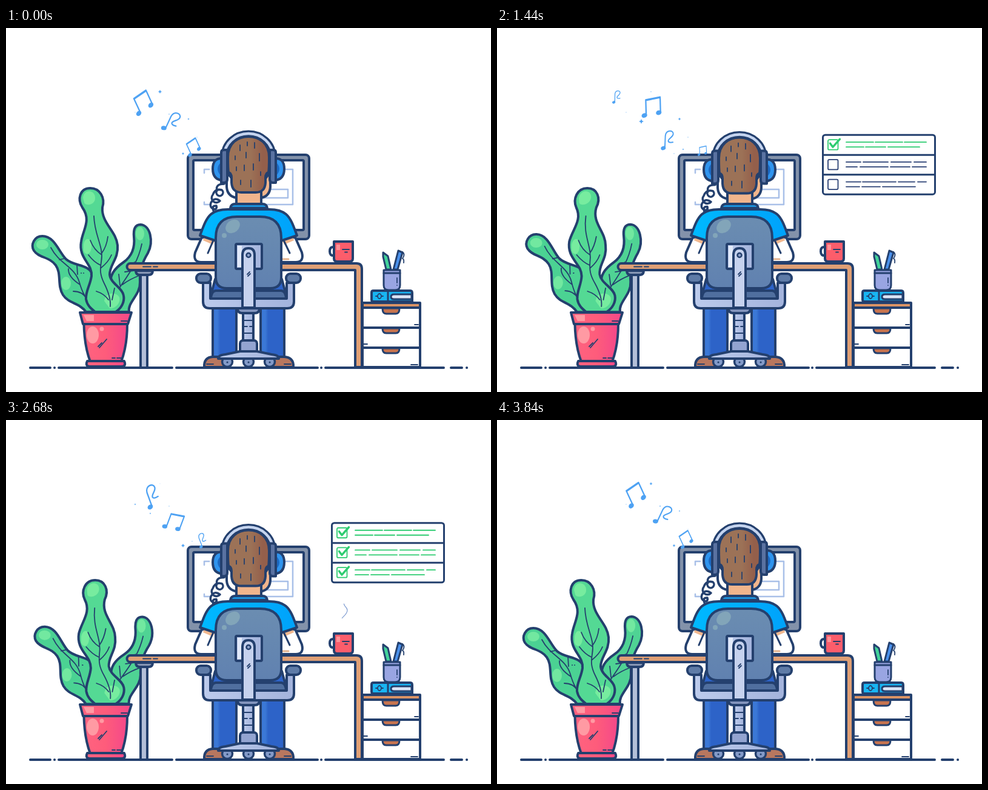
Write an HTML page that moves like this. It is 800 px wide and 600 px high and loops after 3880 ms.

```html
<!DOCTYPE html>
<html lang="en">
<head>
<meta charset="utf-8">
<title>Working with music</title>
<style>
html, body { margin: 0; width: 100%; height: 100%; overflow: hidden; background: #fff; }
svg { display: block; width: 800px; height: 600px; }
.ink { stroke: #24406e; stroke-width: 4; stroke-linecap: round; stroke-linejoin: round; }
.thin { stroke-width: 1.8; fill: none; }
.line { fill: none; }
.flat { stroke: none; }
</style>
</head>
<body>
<svg viewBox="0 0 800 600">
<defs>
  <linearGradient id="pink"><stop stop-color="#ff6380"/><stop offset=".5" stop-color="#fe5c7b"/><stop offset="1" stop-color="#f4488a"/></linearGradient>
  <linearGradient id="hair"><stop offset=".55" stop-color="#9c7257"/><stop offset=".85" stop-color="#945f4b"/></linearGradient>
  <linearGradient id="shirt"><stop stop-color="#00b9ff"/><stop offset="1" stop-color="#00a2fb"/></linearGradient>
  <linearGradient id="jeans"><stop offset=".2" stop-color="#3b78d6"/><stop offset=".32" stop-color="#2d63c8"/></linearGradient>
  <linearGradient id="back" x2="0" y2="1"><stop stop-color="#6b8db1"/><stop offset="1" stop-color="#6081b0"/></linearGradient>
  <linearGradient id="steel"><stop stop-color="#bccbec"/><stop offset="1" stop-color="#a3b3dc"/></linearGradient>
</defs>

<g class="ink">
  <path class="line" d="M40 560H73M80 560h.1M87 560H274M281 560H514M520 560h.1M527 560H722M734 560H752M760 560h.1"/>

  <g id="rightLeaf">
    <path fill="#4fd394" d="M222 324C212 324 210 333 211 344C213 362 208 376 194 386C178 397 171 407 172 425L178 468H203C200 452 222 440 221 419C220 400 225 386 234 371C244 352 238 325 222 324Z"/>
    <ellipse class="flat" cx="221" cy="339" rx="7" ry="11" fill="#72e8a0"/>
    <path class="thin" d="M224 356C218 385 205 402 186 430M212 386L210 400L196 402M220 408Q204 414 192 423M186 406L188 424"/>
  </g>
  <g id="leftLeaf">
    <path fill="#4bd293" d="M60 343C47 343 40 357 46 367C54 379 72 377 82 391C92 405 84 424 94 440C104 455 120 452 132 468H152L142 405C136 389 112 393 99 381C87 369 80 343 60 343Z"/>
    <ellipse class="flat" cx="60" cy="357" rx="10" ry="8" fill="#72e8a0"/>
    <ellipse class="flat" cx="99" cy="421" rx="8" ry="11" fill="#72e8a0"/>
    <path class="thin" d="M74 362C88 389 113 393 121 419C126 437 132 446 140 456M88 382L96 380M103 397Q102 410 122 423M117 390L118 406M124 404h.1M111 434Q126 434 133 446"/>
  </g>
  <g id="midLeaf">
    <path fill="#54d994" d="M139 264C122 264 117 282 126 296C141 317 127 332 124 352C119 380 143 388 141 409C139 424 131 434 132 447C134 458 141 463 147 468H181C190 462 196 452 194 441C192 428 172 421 171 406C171 390 186 380 184 358C182 335 157 321 159 296C164 280 155 264 139 264Z"/>
    <path class="flat" fill="#77ec9f" d="M127 280C128 265 146 266 147 279C148 292 132 294 129 288Z"/>
    <path class="flat" fill="#77ec9f" d="M128 357C131 341 143 348 141 361C140 375 130 375 128 367Z"/>
    <path class="flat" fill="#77ec9f" d="M162 450C164 435 182 434 187 444C190 454 178 464 171 462Z"/>
    <path class="thin" d="M145 310C146 344 162 360 157 386C155 399 155 407 162 421C169 435 173 447 172 459M139 350Q145 366 158 374M168 344Q166 360 158 371M136 374Q145 386 156 391M174 374Q169 386 156 396M149 434Q162 438 169 448M179 429L175 448M128 404h.1"/>
  </g>

  <path fill="url(#pink)" d="M128.500 488C129 514 133 534 139 550H190C196 534 200 514 200 488Z"/>
  <path fill="url(#pink)" d="M122 469H207L201 488H127Z"/>
  <path fill="url(#pink)" d="M134 549H195Q199 558 190 558H139Q130 558 134 549Z"/>
  <g class="flat" fill="#ff9aa3"><ellipse cx="143" cy="506" rx="10" ry="14"/><circle cx="158" cy="496" r="3.5"/><path d="M128 473h17v10h-12z"/></g>
  <path class="thin" d="M152 525L158 519M154 527L166 513M190 483H200M175 544H180M183 544H191"/>

  <rect x="300" y="209" width="200" height="139" rx="6" fill="#8392aa"/>
  <rect x="309" y="218" width="182" height="115" rx="2" fill="#fff"/>
  <path class="line" style="stroke:#a9c0e8;stroke-width:2.5" d="M327 239V233H335M327 287V291H335M440 233H473V291H426M424 266H465V280H424"/>
</g>

<g id="sparks" fill="#4ea2f3"></g>
<g id="notes" fill="none" stroke="#4ea2f3" stroke-width="2.3" stroke-linecap="round" stroke-linejoin="round"></g>

<g class="ink">
  <rect x="222" y="405" width="11" height="155" fill="#b3bfd8"/>
  <path fill="#8797b5" d="M214 400H242Q242 407 235 407H221Q214 407 214 400Z"/>
  <path fill="#df9f75" d="M205 388H578Q587 388 587 397V559H576V399H205A5.5 5.5 0 0 1 205 388Z"/>
  <path class="thin" d="M226 393.500H239M243 393.500H250"/>

  <path fill="#fff" d="M588 460H683V559H588Z"/>
  <path fill="#da9365" d="M588 453H683V461H588Z"/>
  <path class="line" d="M588 494H683M588 527H683"/>
  <path fill="#c8744f" stroke-width="3" d="M621 462H649Q649 471 643 471H627Q621 471 621 462ZM621 495H649Q649 503 643 503H627Q621 503 621 495ZM621 528H649Q649 536 643 536H627Q621 536 621 528Z"/>
  <path class="thin" d="M674 489H680M590 521H596M668 555H679"/>

  <path fill="#18b5f3" d="M606 433H667Q670 433 670 437V451H606Q603 451 603 448V436Q603 433 606 433Z"/>
  <path fill="#dbe5f8" style="stroke-width:3" d="M669 439H640Q635 439 635 443Q635 447 640 447H669Z"/>
  <path class="line" style="stroke-width:3" d="M630 434V450"/>
  <path class="thin" d="M610 442H613M619 442H622M616 438a3 4 0 0 1 0 8a3 4 0 0 1 0 -8"/>
  <path fill="#42d39a" style="stroke-width:3" d="M622 370L630 376L635 398H627L622 377Z"/>
  <path fill="#4a91ec" style="stroke-width:3" d="M647 367L654 370L646 398H639Z"/>
  <path class="thin" d="M654 369Q659 373 654 380Q657 381 656 387"/>
  <path fill="#99a5e2" style="stroke-width:3" d="M623 399H650V424Q650 432 642 432H631Q623 432 623 424Z"/>
  <path class="line" style="stroke-width:3" d="M623 404H650"/>
  <path class="thin" d="M645 412V420M645 424v.1"/>
  <path class="line" d="M541 361Q534 360 534 368Q534 376 541 375"/>
  <path fill="#fc5d6b" d="M541 352H572V380Q572 385 567 385H546Q541 385 541 380Z"/>
  <path class="flat" fill="#ff9197" d="M545 357h6v9h-6z"/>
  <path class="thin" d="M555 365H566M559 369.500H563"/>

  <path fill="#fff" d="M323 345L312 370Q308 386 322 386H346V348ZM477 345L488 370Q492 386 478 386H454V348Z"/>
  <path class="flat" fill="#f1b88f" d="M327 344L345 350L341 357L325 350ZM473 344L455 350L459 357L475 350Z"/>
  <path class="line" style="stroke-width:3" d="M342 350L333 371M458 350L468 371"/>
  <path class="line" style="stroke-width:3;stroke:#e2b18e" d="M456 381H466"/>
  <path fill="url(#shirt)" d="M320 342C326 326 330 314 338 307C345 301 354 299 366 299H434C446 299 455 301 462 307C470 314 474 326 480 342L456 350H344Z"/>
  <path class="flat" fill="#f1b58c" d="M380 264H421V292H380Z"/>
  <path class="line" d="M380 278V290M421 278V290"/>
  <path fill="#1c91dc" d="M370 297Q371 290 378 290H423Q430 290 431 297Z"/>
</g>

<g id="head" class="ink">
  <path class="line" style="stroke-width:3.500" d="M360 257Q345 257 348 268A5.500 5.500 0 1 0 356 267Q345 264 341 275A5.500 5.500 0 1 0 353 285Q344 278 338 288Q335 297 345 299A5 5 0 0 0 347 293Q339 292 342 301"/>
  <path fill="#fff" d="M364 237V262Q365 277 380 280V258Z"/>
  <path fill="#f1b58c" d="M436 237V262Q435 277 421 280V258Z"/>
  <path class="line" style="stroke-width:11" d="M360 211A40 37 0 0 1 440 211"/>
  <path class="line" style="stroke-width:4.500;stroke:#c5d4ef" d="M360 211A40 37 0 0 1 440 211"/>
  <path fill="url(#hair)" d="M366 213C366 190 382 179 400 179C418 179 434 190 434 213C434 228 434 233 433 238Q428 239 428 247V255Q427 271 412 271H388Q373 271 372 255V247Q372 239 367 238Q366 232 366 213Z"/>
  <path class="thin" d="M386 193V202M398 188V194M410 189V198M378 211V217M396 205V214M418 207V219M380 229V235M393 226V235M408 224V234M420 237V243M387 251V258M404 251V262"/>
  <path fill="#2f94ee" d="M357 215Q341 214 341 232Q341 250 357 251ZM443 215Q459 214 459 232Q459 250 443 251Z"/>
  <path class="flat" fill="#1c69c2" d="M355 221Q343 232 355 244ZM445 221Q457 232 445 244Z"/>
  <path fill="#5a72a1" d="M355 205Q355 201 359 201H365V249Q365 255 360 255H355ZM445 205Q445 201 441 201H435V249Q435 255 440 255H445Z"/>
</g>

<g class="ink">
  <path fill="url(#jeans)" d="M341 455H380V542H341Z"/>
  <path fill="url(#jeans)" d="M420 455H459V542H420Z"/>
  <path fill="#2d63c8" d="M345 414L338 440H462L455 414Z"/>
  <path fill="#b8775f" d="M341 542H362V559H327Q326 543 341 542ZM459 542H438V559H474Q475 543 459 542Z"/>
  <path class="thin" d="M331 554H342M459 554H470"/>
  <path fill="#506f9f" d="M338 447Q338 434 346 433H454Q462 434 462 447Z"/>
  <path fill="url(#steel)" d="M325 420V451Q325 462 336 462H464Q475 462 475 451V420H463V446H337V420Z"/>
  <rect x="314" y="405" width="24" height="15" rx="7" fill="#5e7ba7"/>
  <rect x="462" y="405" width="24" height="15" rx="7" fill="#5e7ba7"/>
  <path fill="url(#back)" d="M346 346Q346 311 381 311H419Q454 311 454 346V411Q454 429 436 429H364Q346 429 346 411Z"/>
  <ellipse class="flat" cx="374" cy="327" rx="13" ry="10" transform="rotate(-40 374 327)" fill="#82a5b9"/>
  <circle class="flat" cx="360" cy="342" r="4" fill="#82a5b9"/>
  <path fill="#8294bd" d="M382 462H418Q418 470 410 470H390Q382 470 382 462Z"/>
  <path fill="url(#steel)" d="M391 470H408V516H391Z"/>
  <path class="thin" d="M393 482H406M393 492H398M402 492H407M393 503H406"/>
  <rect x="379" y="356" width="43" height="41" rx="2" fill="url(#steel)"/>
  <path class="flat" fill="#e2eafa" d="M382 359H389V394H382Z"/>
  <path fill="#c6d2ee" d="M390 461V374Q390 363 400 363Q410 363 410 374V461Z"/>
  <circle cx="400" cy="374.500" r="3.500" fill="#8da0c9" style="stroke-width:2.5"/>
  <path class="thin" d="M398 406L402 402M399 409L403 405"/>
  <rect x="386" y="515" width="28" height="24" rx="5" fill="#93a4d1"/>
  <g fill="#849bc9" style="stroke-width:3.500"><circle cx="365" cy="550" r="8.500"/><circle cx="400" cy="550" r="8.500"/><circle cx="435" cy="550" r="8.500"/></g>
  <path fill="url(#steel)" d="M350 545Q350 539 362 538L386 533H414L438 538Q450 539 450 545Z"/>
  <path class="line" style="stroke-width:3" d="M365 551h.1M400 551h.1M435 551h.1"/>
</g>

<path id="steam" fill="none" stroke="#7d9bd0" stroke-width="1.2" pathLength="100" d="M554 348C562 343 555 339 553 333C551 325 562 323 563 314C563 308 559 310 557 302"/>

<g id="list" fill="none" stroke-linecap="round" stroke-linejoin="round">
  <g class="ink" style="stroke-width:3">
    <rect x="537.500" width="185" height="98" rx="4" fill="#fff"/>
    <path d="M538 33H722M538 65.500H722"/>
  </g>
</g>
</svg>

<script>
const LOOP = 3880, STEP = 40, TAU = Math.PI * 2;
const $ = id => document.getElementById(id);
const clamp = v => Math.max(0, Math.min(1, v));

function make(tag, attrs = {}) {
  const el = document.createElementNS('http://www.w3.org/2000/svg', tag);
  for (const k in attrs) el.setAttribute(k, attrs[k]);
  return el;
}
const add = (parent, tag, attrs) => parent.appendChild(make(tag, attrs));

// Linear interpolation through [time, value] pairs
function along(keys, t) {
  let i = 1;
  while (i < keys.length - 1 && t > keys[i][0]) i++;
  const [t0, a] = keys[i - 1], [t1, b] = keys[i];
  return a + (b - a) * clamp((t - t0) / (t1 - t0));
}

const mix = (a, b, k) => `rgb(${a.map((v, i) => Math.round(v + (b[i] - v) * k))})`;
const NAVY = [42, 64, 116], GREEN = [46, 204, 113];

// Middle leaf: every point shifts sideways depending on its height
const leafParts = [...$('midLeaf').children].map(el => [el, el.getAttribute('d')]);
function swayLeaf(s) {
  for (const [el, d] of leafParts) {
    el.setAttribute('d', d.replace(/([\d.]+) ([\d.]+)/g, (m, x, y) => {
      const bend = 12 * s * Math.cos(Math.PI * (y - 262) / 110) * (466 - y) / 204;
      return `${(+x + bend).toFixed(2)} ${y}`;
    }));
  }
}

// Notes: all follow one route, born 970 ms apart
const route = make('path', {
  d: 'M354 211L336 200L315 197L291 192L281 184L277 162L271 149L257 130L234 124L224 122L208 117L190 111'
});
const SINGLE = 'M-5 15V-8C-4 -20 10 -20 10 -12C10 -6 1 -3 1 2Q2 6 10 4';
const DOUBLE = 'M-11 14V-12L13 -16V10M-11 -11L13 -15';
const notes = [0, 1, 2, 3].map(i => {
  const el = add($('notes'), 'g');
  const double = i % 2;
  add(el, 'path', { d: double ? DOUBLE : SINGLE });
  for (const [x, y] of double ? [[-14, 14], [10, 10]] : [[-8, 16]])
    add(el, 'ellipse', { cx: x, cy: y, rx: 3.6, ry: 2.6, fill: '#4ea2f3', transform: `rotate(-20 ${x} ${y})` });
  return { el, birth: 200 + i * 970 };
});
const noteSize = [[0, .3], [320, .5], [900, .8], [1800, .95], [2300, 1], [2700, 1], [3250, .5], [3400, 0]];

// Sparks: x, y, time of the peak, size
const sparks = [
  [254, 105, 150, 1], [301, 150, 260, 1], [238, 154, 450, 1], [292, 207, 780, .8],
  [315, 180, 250, .4], [213, 139, 700, .4], [307, 200, 520, .4], [269, 142, 900, .3]
].map(([x, y, peak, size]) => ({
  x, y, peak, size, el: add($('sparks'), 'path', { d: 'M0 -4L1.300 -1.300L4 0L1.300 1.300L0 4L-1.300 1.300L-4 0L-1.300 -1.300Z' })
}));

// Checklist rows: dashes of the upper and the lower line
const rows = [
  ['M576 12h45m3 0h45m3 0h36', 'M576 20h29m3 0h33m4 0h52'],
  ['M576 12h24m4 0h41m5 0h33m5 0h20', 'M576 20h18m5 0h46m4 0h32m4 0h23'],
  ['M576 12h24m3 0h55m4 0h27m5 0h14', 'M576 20h22m4 0h30m4 0h54']
].map((lines, i) => {
  const g = add($('list'), 'g', { transform: `translate(0 ${i * 32.7})`, 'stroke-width': 1.8 });
  const text = add(g, 'path', { d: lines.join('') });
  const box = add(g, 'rect', { x: 546, y: 8, width: 16.5, height: 16.5, rx: 2 });
  const tick = add(g, 'path', {
    d: 'M549.500 14L554 20L565.500 7', stroke: `rgb(${GREEN})`, 'stroke-width': 3.4, pathLength: 100
  });
  return { text, box, tick, start: 1080 + i * 640 };
});
const listTop = [[250, 196], [520, 187], [1120, 175.5], [1800, 177], [2240, 169], [3120, 170.5], [3500, 174]];
const listFade = [[300, 0], [700, 1], [3040, 1], [3440, 0]];

// Show only the part of a path between two percentages
function trim(el, from, to) {
  el.setAttribute('visibility', to > from ? 'visible' : 'hidden');
  el.setAttribute('stroke-dasharray', `0 ${from} ${Math.max(0, to - from)} 300`);
}

function draw(t) {
  const turn = TAU * t / LOOP;
  const sway = (1 - Math.cos(turn)) / 2;
  swayLeaf(sway);
  $('leftLeaf').setAttribute('transform', `rotate(${2.9 * sway} 130 465)`);
  $('rightLeaf').setAttribute('transform', `rotate(${-1.27 * Math.sin(turn)} 200 462)`);
  $('head').setAttribute('transform', `translate(0 ${1.5 * (1 - Math.cos(2 * turn))})`);

  for (const { el, birth } of notes) {
    const age = (t - birth + LOOP) % LOOP;
    const p = route.getPointAtLength(age * .0635);
    const tilt = -25 * Math.cos(TAU * (age - 720) / 1960);
    el.setAttribute('transform', `translate(${p.x} ${p.y}) rotate(${tilt}) scale(${along(noteSize, age)})`);
  }
  for (const { el, x, y, peak, size } of sparks) {
    const s = size * (1 + Math.cos(TAU * (t - peak) / 970)) / 2;
    el.setAttribute('transform', `translate(${x} ${y}) scale(${s})`);
  }

  $('list').setAttribute('transform', `translate(0 ${along(listTop, t)})`);
  $('list').setAttribute('opacity', along(listFade, t));
  for (const { text, box, tick, start } of rows) {
    const k = clamp((t - start) / 320);
    text.setAttribute('stroke', mix(NAVY, GREEN, k));
    box.setAttribute('stroke', mix(NAVY, GREEN, k));
    trim(tick, 0, 100 * k);
  }
  trim($('steam'), along([[2260, 0], [3200, 100]], t), along([[1720, 0], [2240, 70], [2700, 100]], t));
}

function frame() {
  draw(Math.floor(performance.now() % LOOP / STEP) * STEP);
  requestAnimationFrame(frame);
}
frame();
</script>
</body>
</html>
```
